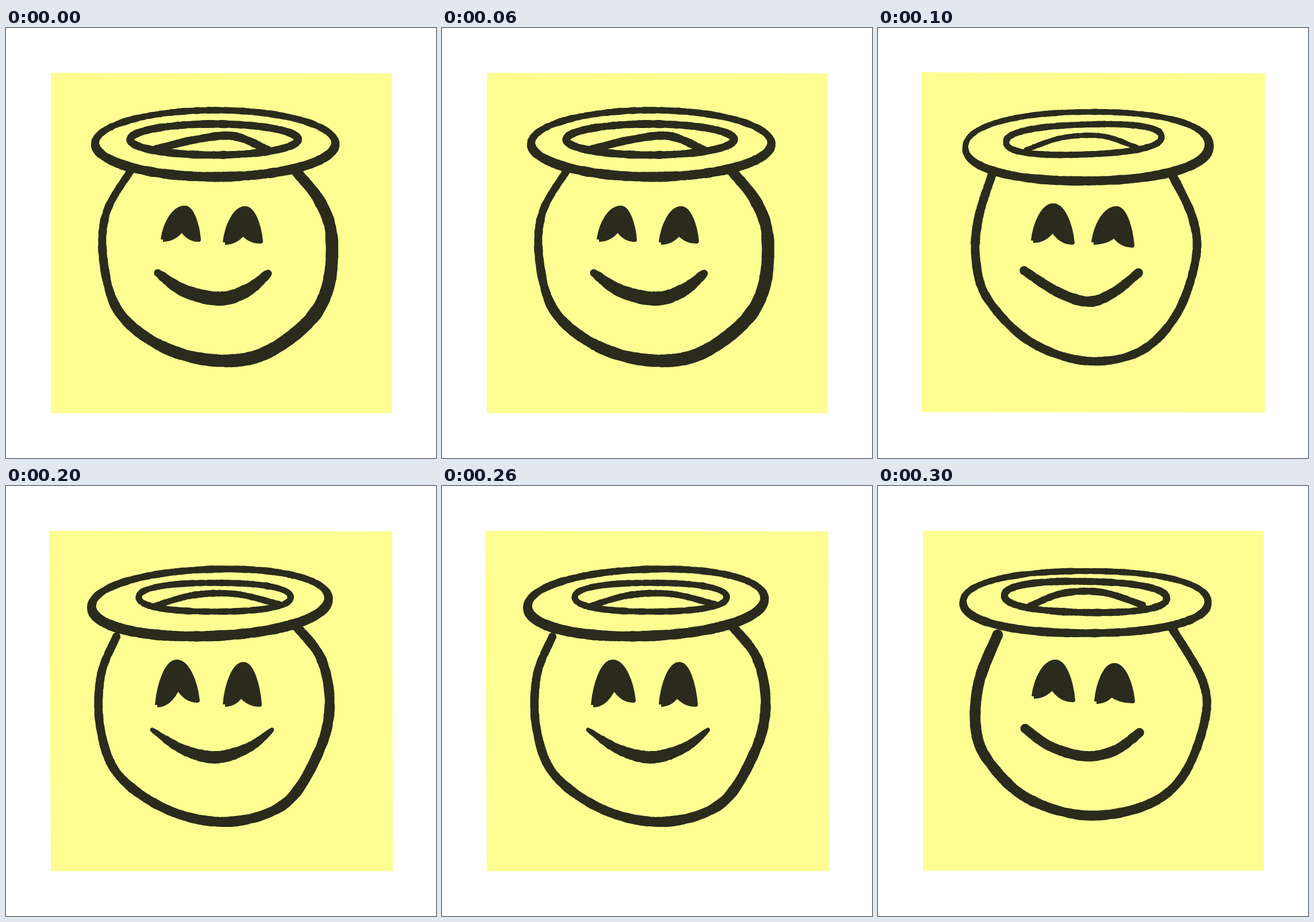
An HTML page with a canvas for the animation above (400 ms loop, 748 by 748 pixels).

```html
<!DOCTYPE html>
<html lang="en">
<head>
<meta charset="utf-8">
<title>Angel note</title>
<style>
  html, body { margin: 0; width: 100%; height: 100%; overflow: hidden; background: #fff; }
  canvas {
    position: absolute; left: 0; top: 0; width: 748px; height: 748px;
    visibility: hidden; animation: flip 400ms step-end infinite;
  }
  @keyframes flip {
    0% { visibility: visible; }
    25%, 100% { visibility: hidden; }
  }
</style>
</head>
<body>
<script>
const PAPER = '#fefd92', INK = '#2a2b1d', FRAME_MS = 100, FRAMES = 4;
let ctx, seed = 7;

const random = () => (seed = (seed * 16807) % 2147483647) / 2147483647;
const parse = text => text.split(' ').map(p => p.split(',').map(Number));
const rad = degrees => degrees * Math.PI / 180;

const spline = (a, b, c, d, t) =>
  b + t / 2 * (c - a + t * (2 * a - 5 * b + 4 * c - d + t * (3 * (b - c) + d - a)));

// Catmull-Rom curve through a few key points.
function curve(text) {
  const keys = parse(text), out = [], steps = 120;
  const at = i => keys[Math.min(keys.length - 1, Math.max(0, i))];
  for (let i = 0; i < keys.length - 1; i++)
    for (let s = 0; s <= steps; s++)
      out.push([0, 1].map(k => spline(at(i - 1)[k], at(i)[k], at(i + 1)[k], at(i + 2)[k], s / steps)));
  return out;
}

// Tilted superellipse, clockwise; a power of 2 is a plain ellipse.
function ring(cx, cy, rx, ry, power = 2, tilt = 0) {
  const bend = v => Math.sign(v) * Math.abs(v) ** (2 / power);
  return Array.from({ length: 1201 }, (_, i) => {
    const a = i / 1200 * 2 * Math.PI;
    const x = rx * bend(Math.cos(a)), y = ry * bend(Math.sin(a));
    return [cx + x, cy + y + x * Math.tan(rad(tilt))];
  });
}

// Marker nib: swells when heading in one direction, and may taper at both ends.
function pen(path, width, { swell = 0, heading = 0, taper = 0 } = {}) {
  ctx.beginPath();
  let rough = 0;
  path.forEach(([x, y], i) => {
    const [x0, y0] = path[Math.max(0, i - 4)], [x1, y1] = path[Math.min(path.length - 1, i + 4)];
    const turn = Math.atan2(y1 - y0, x1 - x0) - rad(heading);
    const end = (2 * i / path.length - 1) ** 2;
    rough = rough * 0.9 + (random() - 0.5) * 0.4;
    const r = Math.max(1, (width + swell * Math.cos(turn)) * (1 - taper * end) / 2 + rough);
    ctx.moveTo(x + r, y);
    ctx.arc(x, y, r, 0, 7);
  });
  ctx.fill();
}

// Smiling eye: a dome over two feet with a notch between them.
function eye(text) {
  const [left, top, right, notch] = parse(text);
  const side = (foot, u, v) => [top[0] + u * (foot[0] - top[0]), top[1] + v * (foot[1] - top[1])];
  const sole = foot => [foot[0] + 0.6 * (notch[0] - foot[0]), foot[1]];
  ctx.beginPath();
  ctx.moveTo(...left);
  ctx.bezierCurveTo(...side(left, 0.9, 0.5), ...side(left, 0.5, 0), ...top);
  ctx.bezierCurveTo(...side(right, 0.5, 0), ...side(right, 0.9, 0.5), ...right);
  ctx.quadraticCurveTo(...sole(right), ...notch);
  ctx.quadraticCurveTo(...sole(left), ...left);
  ctx.fill();
  ctx.stroke();
}

function page(index, corners, draw) {
  const canvas = document.body.appendChild(document.createElement('canvas'));
  canvas.width = canvas.height = 748;
  canvas.style.animationDelay = `${(index - FRAMES) * FRAME_MS}ms`;
  ctx = canvas.getContext('2d');
  ctx.fillStyle = PAPER;
  ctx.beginPath();
  parse(corners).forEach(p => ctx.lineTo(...p));
  ctx.fill();
  ctx.fillStyle = ctx.strokeStyle = INK;
  ctx.lineWidth = 8;
  ctx.lineJoin = 'round';
  draw();
}

page(0, '78,78 671,79 671,670 78,670', () => {
  pen(ring(364, 201, 209, 58), 14, { swell: 2.5, heading: 180 });
  pen(ring(362, 194, 146, 27), 13);
  pen(curve('258,212 325,195 395,188 455,212'), 14);
  pen(curve('217,248 175,320 169,400 194,490 262,549 350,577 440,570 522,515 560,450 566,360 545,300 505,250'),
    18, { swell: 5, heading: -45 });
  eye('273,368 311,313 335,368 306,350');
  eye('381,373 416,314 443,371 412,357');
  pen(curve('264,426 310,457 372,471 420,456 456,427'), 24, { taper: 0.45 });
});

page(1, '76,77 673,79 673,669 76,668', () => {
  pen(ring(364, 206, 212, 60, 2.2, -0.5), 13, { swell: 4, heading: 135 });
  pen(ring(358, 194, 135, 26, 2.4, -2), 11);
  pen(curve('258,212 320,191 390,188 450,208'), 9);
  pen(curve('199,253 175,330 170,400 190,470 262,544 360,579 455,563 520,497 553,400 547,330 511,254'), 15);
  eye('270,370 305,309 338,373 304,351');
  eye('375,373 415,314 442,378 411,361');
  pen(curve('254,422 312,459 366,476 410,460 453,426'), 18, { taper: 0.15 });
});

page(2, '75,78 672,79 673,670 78,670', () => {
  pen(ring(355, 203, 206, 58, 2.1, -2), 15, { swell: 3, heading: 190 });
  pen(ring(363, 193.5, 132, 25, 2.3), 11);
  pen(curve('255,210 325,190 400,188 475,206'), 11);
  pen(curve('192,262 165,330 164,420 196,503 285,565 390,584 487,551 545,460 563,380 548,300 505,244'),
    16, { swell: 2, heading: -45 });
  eye('263,381 297,306 333,373 299,350');
  eye('381,380 413,310 441,380 409,364');
  pen(curve('254,424 307,458 365,472 422,455 463,424'), 21, { taper: 0.7 });
});

page(3, '78,78 671,78 671,669 78,669', () => {
  pen(ring(361, 202, 213, 54, 2.2), 12.5, { swell: 2, heading: 180 });
  pen(ring(361, 193, 141, 27, 2.3, 1), 12);
  pen(curve('260,211 320,187 390,185 460,207'), 12);
  pen(curve('208,259 176,340 170,420 192,478 258,542 360,573 465,556 530,505 568,410 565,340 512,248'),
    17, { swell: 2, heading: 90 });
  eye('271,366 309,306 339,372 303,350');
  eye('380,375 411,312 443,374 406,363');
  pen(curve('256,422 300,453 360,470 412,460 455,429'), 18, { taper: 0.1 });
});
</script>
</body>
</html>
```
